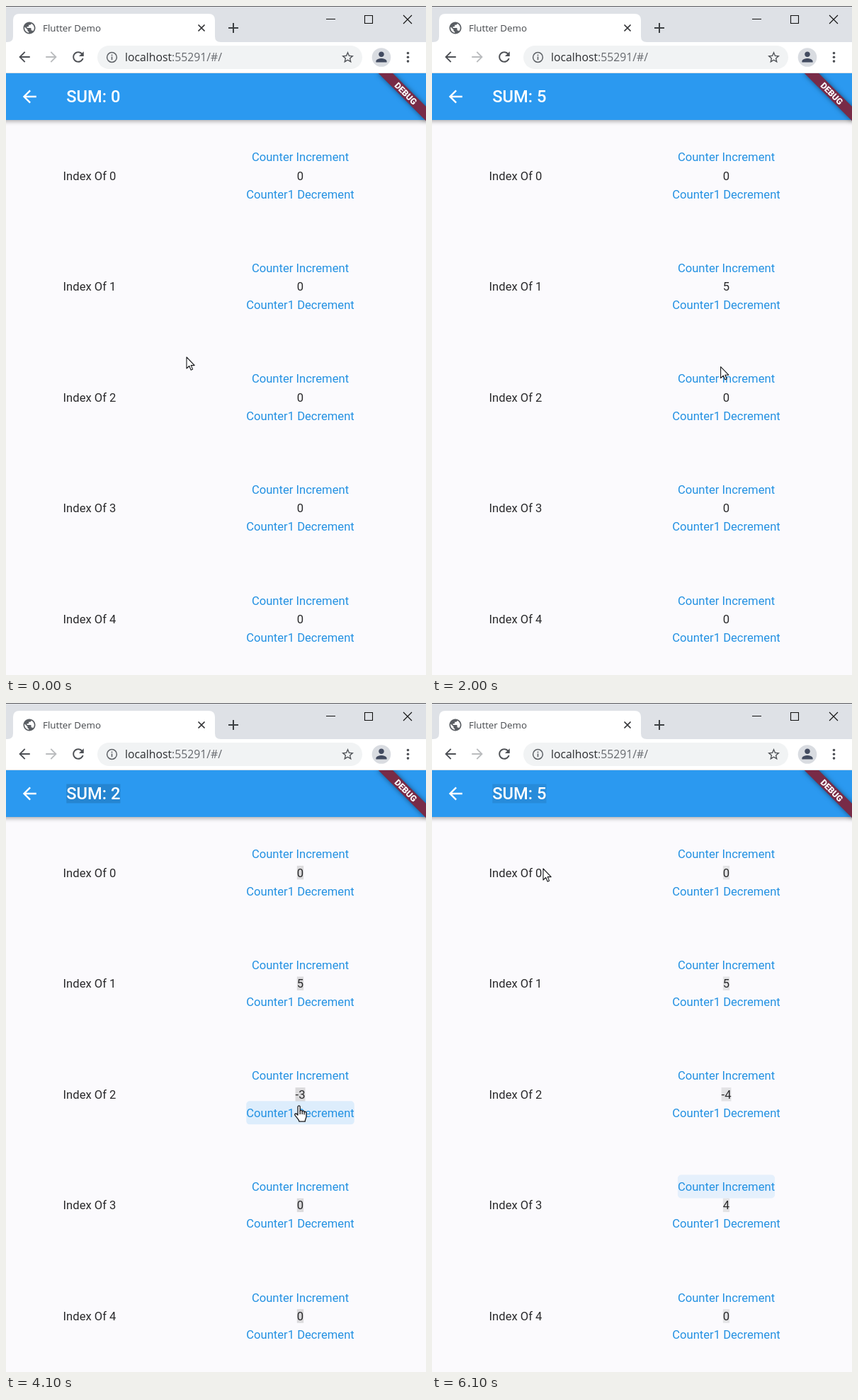
Write an HTML page with a canvas that moves like this. It is 593 by 945 pixels and loops after 6200 ms.

```html
<!DOCTYPE html>
<html lang="en">
<head>
<meta charset="utf-8">
<title>Counter list</title>
<style>
  html, body { margin: 0; width: 100%; height: 100%; overflow: hidden; background: #fbfafd; }
  canvas { display: block; }
</style>
</head>
<body>
<canvas id="stage" width="593" height="945"></canvas>
<script>
const ctx = document.getElementById('stage').getContext('2d');
const W = 593, H = 945, LOOP = 6200, STEP = 100;
const ROWS = 5, PITCH = 156.6, COLUMN = 415.5;
const BODY = '16.6px Roboto, sans-serif';
const TITLE = '500 23.7px Roboto, sans-serif';
const LINK = '#2391e2', INK = '#29292b';

// 24-unit icons, drawn around their centre
const ICON = {
  arrow: 'M20 11H7.83l5.59-5.59L12 4l-8 8 8 8 1.41-1.41L7.83 13H20v-2z',
  reload: 'M17.65 6.35C16.2 4.9 14.21 4 12 4c-4.42 0-7.99 3.58-7.99 8s3.57 8 7.99 8c3.73 0 6.84-2.55 7.73-6h-2.08c-.82 2.33-3.04 4-5.65 4-3.31 0-6-2.69-6-6s2.69-6 6-6c1.66 0 3.14.69 4.22 1.78L13 11h7V4l-2.35 2.35z',
  globe: 'M12 2C6.48 2 2 6.48 2 12s4.48 10 10 10 10-4.48 10-10S17.52 2 12 2zm-1 17.93c-3.95-.49-7-3.85-7-7.93 0-.62.08-1.21.21-1.79L9 15v1c0 1.1.9 2 2 2v1.93zm6.9-2.54c-.26-.81-1-1.39-1.9-1.39h-1v-3c0-.55-.45-1-1-1H8v-2h2c.55 0 1-.45 1-1V7h2c1.1 0 2-.9 2-2v-.41c2.93 1.19 5 4.06 5 7.41 0 2.08-.8 3.97-2.1 5.39z',
  person: 'M12 12c2.21 0 4-1.79 4-4s-1.79-4-4-4-4 1.79-4 4 1.79 4 4 4zm0 2c-2.67 0-8 1.34-8 4v2h16v-2c0-2.66-5.33-4-8-4z',
  star: 'M22 9.24l-7.19-.62L12 2 9.19 8.63 2 9.24l5.46 4.73L5.82 21 12 17.27 18.18 21l-1.63-7.03L22 9.24zM12 15.4l-3.76 2.27 1-4.28-3.32-2.88 4.38-.38L12 6.1l1.71 4.04 4.38.38-3.32 2.88 1 4.28L12 15.4z'
};
const POINTER = new Path2D('M0 0V16L3.7 12.5L6.2 18.2L8.6 17.1L6.2 11.6H11.2Z');
const HAND = new Path2D('M5 14V2.6C5 .4 8.2 .4 8.2 2.6V8.3C8.6 6.9 11.1 7.1 11.2 8.9C11.8 7.7 14 8 14.1 9.8C14.8 8.8 17 9.2 17 11.3V16C17 18.6 15.4 19.6 15.2 23.2H7C6.8 20.5 3.5 18 1.1 14.4C-.2 12.2 2.4 10.6 5 14Z');
const KNUCKLES = new Path2D('M8.2 8V13M11.2 9V13M14.1 10V13.5');

// each session: row, direction, hover span, click times
const SESSIONS = [
  { row: 1, delta: 1, from: 500, to: 1500, clicks: [600, 800, 1000, 1200, 1450] },
  { row: 2, delta: -1, from: 2300, to: 4800, clicks: [2650, 2950, 4000, 4300] },
  { row: 3, delta: 1, from: 5000, to: 6100, clicks: [5150, 5400, 5650, 5900] }
];

// pointer hot spot: time, x, y
const PATH = [
  [0, 255, 496], [100, 255, 496], [500, 413, 371], [1400, 413, 371],
  [1500, 400, 400], [1800, 404, 470], [2300, 413, 569], [4600, 413, 569],
  [4800, 425, 618], [5000, 420, 684], [5900, 420, 684], [6100, 157, 234]
];
const HAND_SPANS = [[500, 1400], [2300, 5900]];

function text(str, x, y, font, color, align = 'left') {
  ctx.font = font;
  ctx.fillStyle = color;
  ctx.textAlign = align;
  ctx.fillText(str, x, y);
}

function rect(x, y, w, h, color, radius = 0) {
  ctx.fillStyle = color;
  ctx.beginPath();
  ctx.roundRect(x, y, w, h, radius);
  ctx.fill();
}

function dot(x, y, r, color) {
  ctx.fillStyle = color;
  ctx.beginPath();
  ctx.arc(x, y, r, 0, Math.PI * 2);
  ctx.fill();
}

function line(d, color, width) {
  ctx.strokeStyle = color;
  ctx.lineWidth = width;
  ctx.stroke(new Path2D(d));
}

function icon(name, x, y, scale, color, flip = 1) {
  ctx.save();
  ctx.translate(x, y);
  ctx.scale(scale * flip, scale);
  ctx.translate(-12, -12);
  ctx.fillStyle = color;
  ctx.fill(new Path2D(ICON[name]));
  ctx.restore();
}

function drawBrowser() {
  rect(0, 0, W, 51, '#dee1e6');
  rect(0, 0, W, 1, '#5c5d60');
  ctx.fillStyle = '#fff';
  ctx.fill(new Path2D('M2 51Q10 51 10 43V20Q10 11 19 11H286Q295 11 295 20V43Q295 51 303 51Z'));
  rect(0, 51, W, 44, '#fff');
  rect(0, 94, W, 1, '#dfe1e4');

  icon('globe', 33, 31, 0.85, '#5a5e63');
  text('Flutter Demo', 52, 36, '13.35px "Open Sans", sans-serif', '#45484c');
  line('M271.5 26.5L280.5 35.5M280.5 26.5L271.5 35.5', '#303134', 1.7);
  line('M314 31H328M321 24V38', '#3c4043', 2);
  line('M452 18.5H465', '#111', 1);
  line('M506.5 13.5H517.5V24.5H506.5Z', '#111', 1.1);
  line('M561 13L573 25M573 13L561 25', '#111', 1.1);

  icon('arrow', 26, 72, 0.97, '#4d5055');
  icon('arrow', 64, 72, 0.97, '#babcbe', -1);
  icon('reload', 102, 72, 0.97, '#4d5055');
  rect(129, 56, 374, 33, '#f1f3f4', 16.5);
  ctx.beginPath();
  ctx.arc(149.5, 72.5, 6.9, 0, Math.PI * 2);
  ctx.strokeStyle = '#5f6368';
  ctx.lineWidth = 1.5;
  ctx.stroke();
  rect(148.7, 71.5, 1.6, 4.7, '#5f6368');
  rect(148.7, 68.6, 1.6, 1.7, '#5f6368');

  const urlFont = '15.75px "Open Sans", sans-serif';
  text('localhost', 168, 78.3, urlFont, '#2b2d30');
  text(':55291/#/', 168 + ctx.measureText('localhost').width, 78.3, urlFont, '#66696e');
  icon('star', 482.5, 72.5, 0.85, '#505358');
  dot(530, 72.5, 13.3, '#d9dce1');
  icon('person', 530, 72, 0.95, '#424b60');
  for (const y of [66.5, 72.3, 78.1]) dot(567.5, y, 1.8, '#4d5055');
}

function drawRibbon() {
  ctx.save();
  ctx.beginPath();
  ctx.rect(0, 95, W, H);
  ctx.clip();
  ctx.translate(W, 95);
  ctx.rotate(Math.PI / 4);
  ctx.save();
  ctx.shadowColor = 'rgba(0,0,0,.5)';
  ctx.shadowBlur = 7;
  rect(-47.5, 33.2, 95, 14.3, '#782b47');
  ctx.restore();
  text('DEBUG', 0, 44.7, '900 12.1px Roboto, sans-serif', '#fff', 'center');
  ctx.restore();
}

function drawAppBar(sum, glow) {
  ctx.save();
  ctx.shadowColor = 'rgba(0,0,0,.33)';
  ctx.shadowBlur = 6;
  ctx.shadowOffsetY = 2;
  ctx.beginPath();
  ctx.rect(0, 95, W, H);
  ctx.clip();
  rect(-10, 95, W + 20, 66, '#2b99f0');
  ctx.restore();
  icon('arrow', 33.3, 128, 1.187, '#fff');
  const label = 'SUM: ' + sum;
  ctx.font = TITLE;
  rect(85.3, 114.5, ctx.measureText(label).width, 27, `rgba(0,0,0,${glow})`);
  text(label, 85.3, 136.4, TITLE, '#fff');
}

function drawButton(label, y, tint) {
  ctx.font = BODY;
  const w = ctx.measureText(label).width;
  if (tint > 0) rect(COLUMN - w / 2, y - 16.5, w, 33, `rgba(33,150,243,${tint})`, 4.7);
  text(label, COLUMN, y + 6, BODY, LINK, 'center');
}

function drawRow(i, value, glow, tints) {
  const y = 239.6 + i * PITCH;
  text('Index Of ' + i, 80.6, y + 5.9, BODY, INK);
  drawButton('Counter Increment', y - 26.4, tints[1] || 0);
  drawButton('Counter1 Decrement', y + 26, tints[-1] || 0);
  const w = ctx.measureText(value).width;
  rect(COLUMN - w / 2, y - 9.7, w, 19.4, `rgba(0,0,0,${glow})`);
  text(value, COLUMN, y + 5.9, BODY, INK, 'center');
}

function pointerAt(t) {
  const next = PATH.findIndex(p => p[0] > t);
  if (next < 0) return PATH[PATH.length - 1].slice(1);
  const [t0, x0, y0] = PATH[next - 1], [t1, x1, y1] = PATH[next];
  const k = (t - t0) / (t1 - t0);
  return [x0 + (x1 - x0) * k, y0 + (y1 - y0) * k];
}

function drawPointer(t) {
  const [x, y] = pointerAt(t);
  const isHand = HAND_SPANS.some(([a, b]) => t >= a && t <= b);
  ctx.save();
  ctx.translate(x, y);
  if (isHand) ctx.translate(-6, -1);
  ctx.lineJoin = 'round';
  ctx.fillStyle = '#fff';
  ctx.strokeStyle = '#17181c';
  ctx.lineWidth = isHand ? 1.3 : 1.1;
  const shape = isHand ? HAND : POINTER;
  ctx.fill(shape);
  ctx.stroke(shape);
  if (isHand) ctx.stroke(KNUCKLES);
  ctx.restore();
}

function fade(age, span) {
  return age >= 0 && age < span ? 1 - age / span : 0;
}

function draw(t) {
  const values = Array(ROWS).fill(0);
  const tints = values.map(() => ({}));
  let lastClick = -Infinity;
  for (const { row, delta, from, to, clicks } of SESSIONS) {
    const done = clicks.filter(c => c <= t);
    values[row] += delta * done.length;
    const latest = done.length ? done[done.length - 1] : -Infinity;
    lastClick = Math.max(lastClick, latest);
    const hover = t >= from && t <= to ? 0.05 : 0;
    tints[row][delta] = hover + 0.12 * fade(t - latest, 350);
  }
  const glow = 0.16 * fade(t - lastClick, 500);

  rect(0, 0, W, H, '#fbfafd');
  drawBrowser();
  drawAppBar(values.reduce((a, b) => a + b), glow);
  drawRibbon();
  values.forEach((v, i) => drawRow(i, v, glow, tints[i]));
  drawPointer(t);
}

const start = performance.now();
function tick() {
  const t = (performance.now() - start) % LOOP;
  draw(Math.floor(t / STEP) * STEP);
  requestAnimationFrame(tick);
}
tick();
</script>
</body>
</html>
```
